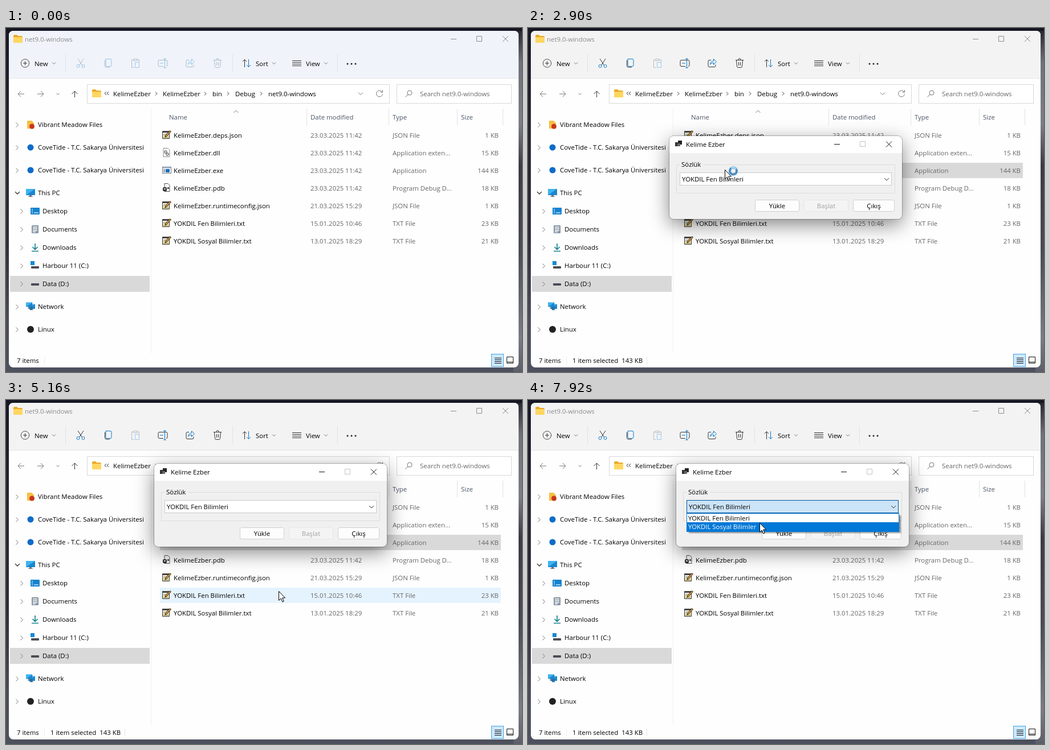
Write an HTML page that moves like this. It is 905x605 px and loops after 7990 ms.

```html
<!DOCTYPE html>
<html lang="en">
<head>
<meta charset="utf-8">
<title>File window</title>
<style>
html, body { margin: 0; width: 100%; height: 100%; overflow: hidden; background: #1b1c27; }
svg { display: block; width: 905px; height: 605px; }
text { font: 11.4px "Open Sans", "Noto Sans", sans-serif; fill: #000; white-space: pre; }
.g { fill: #666; }
.h { fill: #4c5666; }
.l { fill: none; stroke: #333; }
.b { fill: none; stroke: #0a78c8; }
.r { text-anchor: end; }
.m { text-anchor: middle; }
#tools.off .l { stroke: #a9bccb; }
#tools.off .b { stroke: #8fc4ea; }
</style>
</head>
<body>
<svg id="stage" viewBox="0 0 905 605" xmlns="http://www.w3.org/2000/svg"></svg>
<script>
const LOOP = 7990;
const text = (x, y, s, c = '', id = '') => `<text x="${x}" y="${y}" class="${c}" id="${id}">${s}</text>`;
const rect = (x, y, w, h, fill, more = '') => `<rect x="${x}" y="${y}" width="${w}" height="${h}" fill="${fill}" ${more}/>`;
const path = (d, c = 'l', more = '') => `<path d="${d}" class="${c}" ${more}/>`;
const shape = (d, fill, more = '') => `<path d="${d}" fill="${fill}" ${more}/>`;
const disc = (x, y, r, fill, more = '') => `<circle cx="${x}" cy="${y}" r="${r}" fill="${fill}" ${more}/>`;
const at = (x, y, s) => `<g transform="translate(${x} ${y})">${s}</g>`;
const vline = (x, y1, y2, c = '#e2e2e2') => rect(x, y1, 1, y2 - y1, c);
const grey = 'style="stroke:#777"';
const chevron = {
  down: (x, y, s = 3) => path(`M${x - s} ${y - s / 2}l${s} ${s}l${s} ${-s}`, 'l', grey),
  right: (x, y, s = 3.5) => path(`M${x - s / 2} ${y - s}l${s} ${s}l${-s} ${s}`, 'l', grey)
};

const folder = shape('M0 2q0-2 2-2h4l2 2h6q2 0 2 2v8q0 2-2 2h-12q-2 0-2-2z', '#e9a825') +
  shape('M0 5q0-1 1-1h14q1 0 1 1v7q0 2-2 2h-12q-2 0-2-2z', '#ffd660');

const note = shape('M.5 2.5h12v12h-12z', '#fbfaf0', 'stroke="#333"') +
  rect(0, 1, 13, 3, '#444') + rect(1, 9, 11, 5, '#efe3a0') +
  shape('M2 6.500h7M2 8.500h6M2 12.500h9', 'none', 'stroke="#8d927f"') +
  shape('M5 12l1-3.500l7.500-8l2 1.500l-7 8z', '#d99a3a', 'stroke="#2c2118"');
const gearPage = shape('M2 .5h8l3 3v12h-11z', '#fafafa', 'stroke="#8a8a8a"') +
  disc(6, 7, 2, 'none', 'stroke="#777" stroke-width="1.5"') + disc(9, 11, 2, 'none', 'stroke="#777" stroke-width="1.5"');
const appIcon = rect(.5, 2.5, 15, 11, '#fff', 'stroke="#6d7a88"') + rect(1, 3, 14, 2, '#b5c7d8') +
  rect(2, 6, 3, 6, '#9aa7b4') + rect(6, 6, 7, 6, '#1c6fb8');
const dataPage = shape('M4 .5h6l3 3v11h-9z', '#f5f5f5', 'stroke="#555"') +
  rect(1, 7, 7, 7, '#333', 'rx="2"') + rect(3, 9, 3, 2, '#ddd') + rect(9, 7, 3, 3, '#555');

const files = [
  ['KelimeEzber.deps.json', '23.03.2025 11:42', 'JSON File', '1 KB', note],
  ['KelimeEzber.dll', '23.03.2025 11:42', 'Application exten...', '15 KB', gearPage],
  ['KelimeEzber.exe', '23.03.2025 11:42', 'Application', '144 KB', appIcon],
  ['KelimeEzber.pdb', '23.03.2025 11:42', 'Program Debug D...', '18 KB', dataPage],
  ['KelimeEzber.runtimeconfig.json', '21.03.2025 15:29', 'JSON File', '1 KB', note],
  ['YOKDIL Fen Bilimleri.txt', '15.01.2025 10:46', 'TXT File', '23 KB', note],
  ['YOKDIL Sosyal Bilimler.txt', '13.01.2025 18:29', 'TXT File', '21 KB', note]
];
const rowTop = i => 175 + 31 * i;

const monitor = shape('M0 1h16v11h-16z', '#1a86d0') + shape('M0 1h16l-16 11z', '#3fb3ee') +
  rect(6, 12, 4, 2, '#6b7680') + rect(4, 14, 8, 1, '#6b7680');
const cloudDot = disc(8, 8, 5.5, '#0f6cc9');
const drive = rect(1, 7, 14, 4, '#4a4d55', 'rx="1"');
const places = [
  [170, 0, 'Vibrant Meadow Files', shape('M2 1h8l4 4v10h-12z', '#f6c042') + disc(10.5, 11, 4.5, '#c8371d')],
  [210, 0, 'CoveTide - T.C. Sakarya Üniversitesi', cloudDot],
  [250, 0, 'CoveTide - T.C. Sakarya Üniversitesi', cloudDot],
  [290, 0, 'This PC', monitor],
  [322, 8, 'Desktop', rect(0, 2, 16, 12, '#1583cf', 'rx="1"') + shape('M2 5h2M2 8h2M2 11h2M6 11h8', 'none', 'stroke="#bfe4fb" stroke-width="1.4"')],
  [354, 8, 'Documents', rect(2, 1, 12, 14, '#8796a5', 'rx="1"') + shape('M4 4h8M4 7h8M4 10h8M4 12.500h5', 'none', 'stroke="#fff" stroke-width="1.3"')],
  [386, 8, 'Downloads', shape('M8 1v10M3.500 7l4.500 4.500l4.500-4.500M2 14.500h12', 'none', 'stroke="#14828f" stroke-width="1.7"')],
  [418, 8, 'Harbour 11 (C:)', rect(1, 9, 14, 4, '#4a4d55', 'rx="1"') + rect(0, 0, 7, 7, '#1787d8')],
  [450, 8, 'Data (D:)', drive],
  [490, 0, 'Network', at(4, 3, `<g transform="scale(.75)">${monitor}</g>`) + `<g transform="scale(.7)">${monitor}</g>` + disc(9, 11, 3, '#2b6f9e')],
  [530, 0, 'Linux', disc(8, 8, 6, '#222')]
];

function sidebar() {
  return rect(7, 436, 245, 28, '#d9d9d9') + places.map(([y, dx, name, icon]) =>
    (name === 'This PC' ? path(`M16 ${y - 2}l4 4l4-4`, 'l', 'stroke-width="1.3"') : chevron.right(19.5 + dx, y + .5, 4)) +
    at(35 + dx, y - 8, icon) + text(56 + dx, y + 4, name)).join('') + vline(254, 142, 572, '#f0f0f0');
}

function toolbar() {
  return disc(33.5, 62, 7.2, 'none', 'stroke="#444"') + path('M30 62h7M33.500 58.500v7') +
    text(50, 67, 'New') + chevron.down(84, 62) +
    [104, 397, 581].map(x => vline(x, 46, 78, '#dfe2e7')).join('') +
    '<g id="tools">' +
    path('M126 54l7.500 11.500M136 54l-7.500 11.500') + path('M124 67a2.500 2.500 0 1 0 5 0a2.500 2.500 0 1 0-5 0M133 67a2.500 2.500 0 1 0 5 0a2.500 2.500 0 1 0-5 0', 'b') +
    path('M175 54.500h8q2 0 2 2v9q0 2-2 2h-6q-2 0-2-2z', 'b') + path('M173.500 56.500v10q0 2.500 2.500 2.500h6') +
    path('M281 56.500h-12q-2 0-2 2v7q0 2 2 2h7M281 67.500q2 0 2-2v-7q0-2-2-2') + path('M278.500 54v16M276 54h5M276 70h5M270 62h6', 'b') +
    path('M321 56.500h-3q-2 0-2 2v8q0 2 2 2h9q2 0 2-2v-2') + path('M319.500 64q1-6 6-6v-3.500l5 5l-5 5v-3.500q-4 0-6 3z', 'b') +
    path('M364 56.500h14M369 56q0-2.500 2-2.500t2 2.500M365.500 57l1 10.500q.2 2 2 2h5q1.800 0 2-2l1-10.500M369.500 60v6M372.500 60v6') +
    '</g>' +
    path('M224 56h-3.500v13.500h4M230 56h3.500v4M224 54.500h6v3h-6z', 'l', 'style="stroke:#b3bec8"') +
    path('M226.500 60.500h7v9h-7z', 'b', 'style="stroke:#9ccbee"') +
    path('M418.500 69v-13M415 59l3.500-3.500l3.500 3.500') + path('M425.500 55v13M422 65l3.500 3.500l3.500-3.500', 'b') +
    text(438, 67, 'Sort') + chevron.down(470, 62) +
    path('M502 57.500h16M502 60.500h16M502 63.500h16M502 66.500h16') + text(526, 67, 'View') + chevron.down(561, 62) +
    [599, 606, 613].map(x => disc(x, 63, 1.5, '#222')).join('');
}

function address() {
  const crumbs = [[188, 'KelimeEzber'], [275, 'KelimeEzber'], [362, 'bin'], [402, 'Debug'], [460, 'net9.0-windows']];
  return path('M32 116h-11M26 111l-5 5l5 5M55 116h11M61 111l5 5l-5 5', 'l', grey) + chevron.down(91, 116, 2.5) +
    path('M120.500 122v-11M115.500 116l5-5l5 5') +
    rect(142.5, 99.5, 530, 33, '#fff', 'stroke="#d9d9d9"') + rect(685.5, 99.5, 201, 33, '#fff', 'stroke="#d9d9d9"') +
    at(151, 108, folder) + path('M176 112l-3 3l3 3M180 112l-3 3l3 3') +
    crumbs.map(([x, s]) => text(x, 120, s)).join('') +
    [264, 350, 390, 448].map(x => path(`M${x - 2} 112.500l3 3l-3 3`)).join('') +
    chevron.down(622, 115.5, 4) + path('M660 113a5.500 5.500 0 1 0 .5 3.500M660.500 109v4h-4', 'l', grey) +
    disc(708, 114, 4, 'none', 'stroke="#777"') + path('M705 117l-4.500 4.500', 'l', grey) +
    text(726, 120, 'Search net9.0-windows', 'g');
}

function list() {
  return path('M399.500 149l4-4l4 4', 'l', grey) +
    [[286, 'Name'], [534, 'Date modified'], [678, 'Type'], [798, 'Size']].map(([x, s]) => text(x, 161, s, 'h')).join('') +
    [527, 671, 791, 871].map(x => vline(x, 142, 171)).join('') +
    rect(270, 0, 598, 27, '#e5f3ff', 'id="hover"') +
    rect(270.5, rowTop(2) + .5, 597, 26, '#cce8ff', 'id="picked"') +
    files.map(([name, date, type, size, icon], i) => {
      const y = rowTop(i) + 18;
      return at(274, y - 13, icon) + text(294, y, name) + text(534, y, date, 'g') +
        text(678, y, type, 'g') + text(864, y, size, 'g r');
    }).join('');
}

const windowKeys = (x, y) => path(`M${x} ${y}h10`) + path(`M${x + 45.5} ${y - 5}h9v9h-9z`) +
  path(`M${x + 91} ${y - 5.5}l10 10m0-10l-10 10`);

function explorer() {
  return rect(5, 5, 894, 592, '#fefefe', 'rx="8"') +
    shape('M5 88v-75q0-8 8-8h878q8 0 8 8v75z', '#f3f3f3', 'id="bar"') + rect(5, 88, 894, 1, '#e3e5e8') +
    at(13, 12, folder) + text(33, 24, 'net9.0-windows', '', 'title') +
    `<g id="keys">${windowKeys(780, 19.5)}</g>` +
    toolbar() + address() + list() + sidebar() +
    text(19, 589, '7 items') + vline(67, 578, 591, '#ececec') +
    `<g id="status">${text(78, 589, '1 item selected  143 KB')}${vline(208, 578, 591, '#e2e2e2')}</g>` +
    rect(851.5, 573.5, 21, 22, '#cce8ff', 'stroke="#4aa3df"') +
    path('M857 580.500h12M857 583.500h12M857 586.500h12M857 589.500h12', 'l', 'style="stroke:#111"') +
    path('M878.500 578.500h11v11h-11zM878 587.500h12', 'l', 'style="stroke:#111"');
}

const button = (x, w, s, off) => rect(x + .5, 112.5, w - 1, 20, off ? '#f4f4f4' : '#fdfdfd',
  `rx="3" stroke="${off ? '#e6e6e6' : '#cfcfcf'}"`) + `<text x="${x + w / 2}" y="127" class="m" ${off ? 'style="fill:#a2a2a2"' : ''}>${s}</text>`;

function dialog() {
  return rect(0, 0, 408, 146, '#f0f0f0', 'rx="8" id="card"') +
    shape('M0 30v-22q0-8 8-8h392q8 0 8 8v22z', '#fff') +
    rect(-.5, -.5, 409, 147, 'none', 'rx="8" stroke="#000" stroke-opacity=".25"') +
    rect(10, 11, 6, 7, '#333') + rect(15, 8, 7, 7, '#222') + rect(14, 13, 5, 5, '#666') +
    text(29, 19, 'Kelime Ezber') + path('M289 14.500h10M380 9.500l10 10m0-10l-10 10', 'l', 'style="stroke:#111"') +
    path('M334.500 9.500h9v9h-9z', 'l', 'style="stroke:#c4c4c4"') +
    path('M18 50.500h-5.500v50h383v-50h-336', 'l', 'style="stroke:#dcdcdc"') + text(21, 54, 'Sözlük') +
    rect(18.5, 64.5, 371, 22, '#fff', 'stroke="#c9c9c9" id="combo"') + text(22, 80, 'YOKDIL Fen Bilimleri') +
    path('M377 74l4 4l4-4') +
    button(150, 78, 'Yükle') + button(236, 78, 'Başlat', true) + button(322, 73, 'Çıkış') +
    '<g id="drop">' + rect(22, 91, 372, 31, '#000', 'opacity=".4" filter="url(#soft)"') +
    rect(18.5, 87.5, 372, 32, '#fff', 'stroke="#0078d7"') + rect(19, 88, 371, 15, '#0078d7', 'id="choice"') +
    text(21, 100, 'YOKDIL Fen Bilimleri', '', 'first') + text(21, 115, 'YOKDIL Sosyal Bilimler', '', 'second') + '</g>';
}

const stops = list => list.map(([at, c]) => `<stop offset="${at}" stop-color="${c}"/>`).join('');
const stage = document.getElementById('stage');
stage.innerHTML = `<defs>
  <linearGradient id="sky" x1="0" y1="0" x2="0" y2="1">${stops([[0, '#171824'], [.3, '#24252f'], [.6, '#2b2c37'], [.85, '#4a4c57'], [1, '#4d505d']])}</linearGradient>
  <linearGradient id="edge" x1="0" y1="0" x2="0" y2="1">${stops([[0, '#20212b'], [.1, '#70727b'], [.28, '#7c7e88'], [.4, '#3a3b45'], [.65, '#4a4c56'], [.9, '#7a7c87'], [1, '#5c5e69']])}</linearGradient>
  <filter id="soft" x="-10%" y="-50%" width="120%" height="200%"><feGaussianBlur stdDeviation="1.3"/></filter>
  <filter id="shade" x="-20%" y="-50%" width="140%" height="220%"><feDropShadow dx="0" dy="10" stdDeviation="17" flood-opacity=".48"/></filter>
  <clipPath id="open"><rect x="0" y="87" width="408" height="40" id="reveal"/></clipPath></defs>` +
  rect(0, 0, 905, 605, 'url(#sky)') + rect(890, 0, 15, 605, 'url(#edge)') + rect(0, 0, 905, 5, '#161723') + explorer() +
  `<g id="dialog">${dialog()}</g>` +
  '<g id="pointer">' + disc(0, 1, 12, '#fff04a', 'id="press" opacity=".8"') +
  shape('M.5 .5v16l3.700-3.500l2.700 6l2.400-1l-2.700-6h5z', '#fff', 'stroke="#000" stroke-linejoin="round"') +
  '<g id="busy">' + disc(15, 2.5, 6, 'none', 'stroke="#4a8fc6" stroke-width="4"') +
  shape('M15-3.500a6 6 0 0 1 6 6', 'none', 'stroke="#a8d8f5" stroke-width="3" id="spin"') + '</g></g>';

const el = id => document.getElementById(id);
const show = (id, on) => el(id).style.display = on ? '' : 'none';
const set = (id, key, value) => el(id).setAttribute(key, value);
el('card').setAttribute('filter', 'url(#shade)');
el('drop').setAttribute('clip-path', 'url(#open)');

const moves = [ // time, x, y
  [860, 352, 612], [1200, 372, 420], [1540, 346, 250], [3300, 346, 250], [3800, 438, 206], [3890, 438, 206],
  [4050, 440, 194], [4180, 446, 158], [4310, 450, 128], [4450, 450, 128], [4850, 468, 260], [5220, 480, 343],
  [5290, 480, 340], [5430, 478, 314], [5690, 471, 378], [5900, 462, 402], [6120, 458, 402], [6400, 254, 372],
  [6710, 431, 312], [6910, 441, 207], [6970, 441, 207], [7130, 440, 191], [7740, 440, 191], [7920, 407, 217]
];
const presses = [[1820, 1890], [1990, 2060], [3830, 4430], [7270, 7350]];
const tints = [ // time, toolbar colour
  [0, [240, 243, 249]], [70, [240, 243, 249]], [200, [243, 243, 243]], [1820, [243, 243, 243]],
  [1990, [239, 243, 251]], [2630, [239, 243, 251]], [2800, [243, 243, 243]]
];
const clamp = v => Math.max(0, Math.min(1, v));
const ease = p => p * p * (3 - 2 * p);

function along(keys, t, curve) {
  const i = keys.findIndex(k => k[0] > t);
  if (i < 0) return keys[keys.length - 1].slice(1).flat();
  if (i === 0) return keys[0].slice(1).flat();
  const a = keys[i - 1], b = keys[i], p = curve((t - a[0]) / (b[0] - a[0]));
  const from = a.slice(1).flat(), to = b.slice(1).flat();
  return from.map((v, n) => v + (to[n] - v) * p);
}

function draw(t) {
  const [x, y] = along(moves, t, ease);
  const selected = t >= 1820, active = selected && t < 2640, opened = t >= 2640;
  set('bar', 'fill', `rgb(${along(tints, t, p => p).map(Math.round)})`);
  el('title').style.fill = active ? '#000' : '#8b8b8b';
  el('keys').querySelectorAll('path').forEach(p => p.style.stroke = active ? '#111' : '#8b8b8b');
  el('tools').setAttribute('class', selected ? '' : 'off');
  show('status', selected);
  show('picked', selected);
  set('picked', 'fill', active ? '#cce8ff' : '#d9d9d9');
  set('picked', 'stroke', active ? '#99d1ff' : '#d9d9d9');

  const [dragX, dragY] = along(moves, Math.max(3850, Math.min(t, 4310)), ease);
  const left = 248 + Math.round(dragX - 438), top = 190 + Math.round(dragY - 206);
  const grow = 1 - (1 - clamp((t - 2640) / 260)) ** 3, scale = .9 + .1 * grow;
  show('dialog', opened);
  set('dialog', 'opacity', grow);
  set('dialog', 'transform', `translate(${left + 204 * (1 - scale)} ${top + 73 * (1 - scale)}) scale(${scale})`);

  const inDialog = opened && x >= left && x < left + 408 && y >= top && y < top + 146;
  const row = Math.floor((y - 175) / 31);
  const onRow = t >= 860 && !inDialog && x >= 270 && x < 868 && row >= 0 && row < 7 && y < rowTop(row) + 27;
  show('hover', onRow && !(selected && row === 2));
  if (onRow) set('hover', 'y', rowTop(row));

  const dropped = t >= 7330, onCombo = inDialog && y >= top + 64 && y < top + 87;
  set('combo', 'fill', dropped ? '#cce4f7' : onCombo ? '#e5f1fb' : '#fff');
  set('combo', 'stroke', dropped ? '#005499' : onCombo ? '#0078d7' : '#c9c9c9');
  show('drop', dropped);
  set('reveal', 'height', 40 * clamp((t - 7310) / 160));
  const second = dropped && y >= top + 103;
  set('choice', 'y', second ? 103 : 88);
  set('choice', 'height', second ? 16 : 15);
  el('first').style.fill = second ? '#000' : '#fff';
  el('second').style.fill = second ? '#fff' : '#000';

  show('pointer', t >= 860);
  set('pointer', 'transform', `translate(${Math.round(x) - 1} ${Math.round(y) - 1})`);
  show('press', presses.some(([a, b]) => t >= a && t < b));
  show('busy', t >= 2130 && t < 2960);
  set('spin', 'transform', `rotate(${t * .36} 15 2.5)`);
}

const start = performance.now();
function tick() {
  draw((performance.now() - start) % LOOP);
  requestAnimationFrame(tick);
}
draw(0);
requestAnimationFrame(tick);
</script>
</body>
</html>
```
